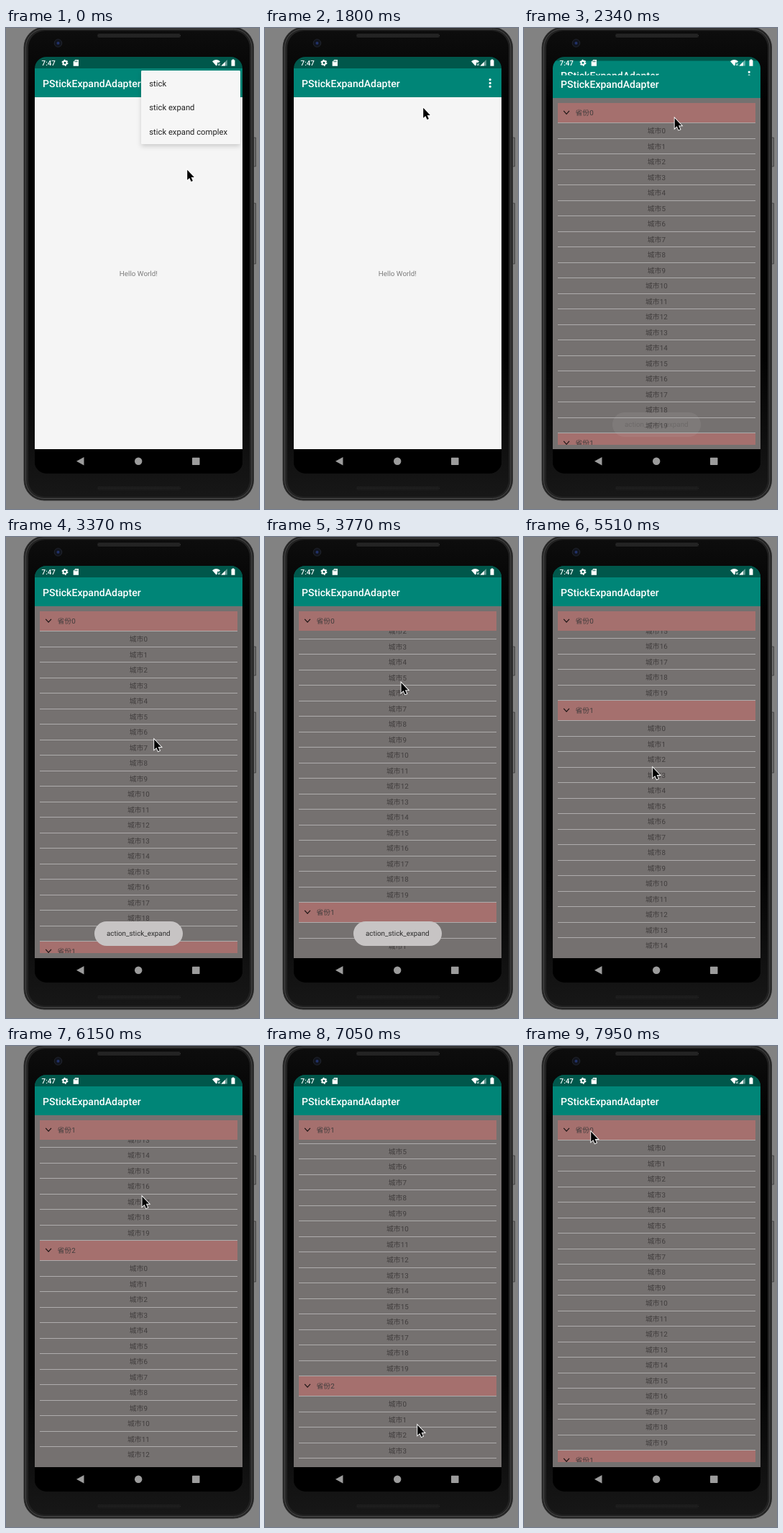
Write an HTML page that moves like this. It is 352 by 667 pixels and loops after 8 s.

```html
<!DOCTYPE html>
<html lang="en">
<head>
<meta charset="utf-8">
<title>Sticky list demo</title>
<style>
  html, body { margin: 0; width: 100%; height: 100%; overflow: hidden; background: #828282; }
  svg { display: block; }
  text {
    font-family: Roboto, "Noto Sans CJK SC", "Noto Sans CJK", sans-serif;
    font-size: 9.84px;
    text-rendering: geometricPrecision;
  }
  .mid { text-anchor: middle; }
  .title { font-size: 14.06px; font-weight: 500; fill: #fff; }
  .clock { font-weight: 500; fill: #fff; }
  .menu text { font-size: 11.25px; fill: #212121; }
  #list text, #sticky text { fill: #403d3d; }
  .pink { fill: #a5706e; }
  .line { fill: #aeacac; shape-rendering: crispEdges; }
</style>
</head>
<body>
<svg id="stage" width="352" height="667" viewBox="0 0 352 667">
  <defs>
    <linearGradient id="glass" x2="0" y2="1">
      <stop offset="0" stop-color="#0d0d0d"/>
      <stop offset=".15" stop-color="#020202"/>
      <stop offset=".7" stop-color="#020202"/>
      <stop offset="1" stop-color="#171717"/>
    </linearGradient>
    <pattern id="mesh" width="2" height="2" patternUnits="userSpaceOnUse">
      <rect width="2" height="2" fill="#1b1b1b"/>
      <rect width="1" height="1" fill="#3c3c3c"/>
    </pattern>
    <filter id="shade" x="-20%" y="-20%" width="140%" height="150%">
      <feDropShadow dx="0" dy="3" stdDeviation="3" flood-opacity=".17"/>
    </filter>
    <clipPath id="screen"><rect x="40" y="40" width="289" height="577.5" rx="16"/></clipPath>
    <clipPath id="reveal"><rect id="revealBox" x="40" y="40" width="289" height="544"/></clipPath>
    <g id="bar">
      <rect x="40" y="30" width="289" height="26.5" fill="#00574b"/>
      <rect x="40" y="56" width="289" height="40" fill="#008577"/>
      <text class="title" x="51" y="81.5">PStickExpandAdapter</text>
    </g>
    <path id="chevron" d="M55.2 113.8l3.9 4.4 3.9-4.4" fill="none" stroke="#1c1414" stroke-width="1.2"/>
  </defs>

  <!-- phone body -->
  <rect width="352" height="667" fill="#828282"/>
  <path d="M344 152h3.500v40h-3.500zM344 243h3.500v84h-3.500z" fill="#6c6c6c" stroke="#3a3a3a" stroke-width=".8"/>
  <rect x="25" y="-1" width="319.500" height="656" rx="28" fill="#222" stroke="#303030"/>
  <rect x="27.500" y="1.500" width="314.500" height="651" rx="25.500" fill="none" stroke="#4a4a4a"/>
  <rect x="31" y="4" width="308" height="646" rx="23" fill="url(#glass)"/>
  <rect x="127" y="8" width="116" height="5" rx="2.500" fill="url(#mesh)"/>
  <rect x="127" y="636" width="116" height="4.500" rx="2.200" fill="url(#mesh)" opacity=".5"/>
  <circle cx="72.500" cy="21" r="5.300" fill="#11141d" stroke="#22252e"/>
  <circle cx="72.500" cy="21" r="2" fill="#22326a"/>

  <g clip-path="url(#screen)">
    <rect x="40" y="40" width="289" height="578" fill="#000"/>
    <g id="home">
      <rect x="40" y="90" width="289" height="512" fill="#f5f5f5"/>
      <use href="#bar"/>
      <g fill="#fff">
        <circle cx="313.2" cy="71.6" r="1.6"/><circle cx="313.2" cy="76.4" r="1.6"/><circle cx="313.2" cy="81.2" r="1.6"/>
      </g>
      <text class="mid" x="184.3" y="344" fill="#7d7d7d">Hello World!</text>
    </g>

    <g id="popup" class="menu">
      <rect x="188" y="59" width="138" height="102" rx="1.4" fill="#f6f6f6" filter="url(#shade)"/>
      <rect id="press" x="188" y="93" width="138" height="34"/>
      <text x="199.3" y="80.5">stick</text>
      <text x="199.3" y="114.3">stick expand</text>
      <text x="199.3" y="148">stick expand complex</text>
    </g>

    <g clip-path="url(#reveal)">
      <g id="page">
        <rect x="40" y="90" width="289" height="494" fill="#757170"/>
        <use href="#bar"/>
        <svg x="47" y="103" width="275" height="474" viewBox="47 103 275 474"><g id="list"></g></svg>
        <g id="sticky">
          <rect class="pink" x="47" y="103" width="275" height="27"/>
          <use href="#chevron"/>
          <text id="stickyName" x="71.5" y="120.4"></text>
        </g>
      </g>
    </g>

    <!-- system bars -->
    <text class="clock" x="49.6" y="52">7:47</text>
    <g fill="#fff">
      <circle cx="82" cy="48.2" r="2.5" fill="none" stroke="#fff" stroke-width="1.9"/>
      <circle cx="82" cy="48.2" r="3.8" fill="none" stroke="#fff" stroke-width="1.4" stroke-dasharray="2 1.98"/>
      <path d="M96.3 44h4.7v8.7h-7.3v-6z"/>
      <path d="M95.9 45.3v2M97.5 45.3v2M99.1 45.3v2" stroke="#00574b" stroke-width=".8"/>
      <path d="M287 46.2q5.5-4.6 11 0l-1.6 1.9h-2.4v2.8l-1.5 1.7z"/>
      <path d="M295 49.2l2.8 2.8m0-2.8l-2.8 2.8" stroke="#fff"/>
      <path d="M307.8 44v8.5h-8.500z" opacity=".4"/>
      <path d="M304.8 47v5.5h-5.500z"/>
      <path d="M314.8 43.6h2.4v1h1.3v8.1h-5v-8.1h1.3z"/>
    </g>
    <rect x="40" y="584" width="289" height="34"/>
    <g fill="#9c9c9c">
      <path d="M98 600.7l10.5-5.8v11.6z"/>
      <circle cx="184.2" cy="600.7" r="5.2"/>
      <rect x="259" y="595.7" width="10.5" height="10.3" rx=".7"/>
    </g>

    <g id="toast">
      <rect x="123" y="533" width="123" height="34" rx="17" fill="#c7c4c4"/>
      <text class="mid" x="184.3" y="553.4" fill="#2b2b2b">action_stick_expand</text>
    </g>
  </g>

  <g id="cursor">
    <path d="M.2.8v14l3.1-2.900 2.300 5.200 2.300-1-2.300-5.100h4.300z" stroke="#fff" stroke-width="1.800" paint-order="stroke"/>
  </g>
</svg>

<script>
const LOOP = 8000, ROW = 21.5, HEAD = 28, CITIES = 20;
const SECTION = HEAD + ROW * CITIES;
const $ = id => document.getElementById(id);

// Where the hand rests or turns: time, x, y
const turns = [
  [0, 252, 196], [460, 209, 104], [760, 209, 104], [1030, 220, 110], [1800, 220, 110],
  [2600, 206, 129], [3020, 205, 320], [3370, 206, 280], [3850, 188, 195], [4400, 183, 340],
  [4890, 181, 205], [5510, 179, 319], [6270, 190, 200], [7050, 212, 525], [7950, 93, 118]
];
// Each swipe of the list: start, duration, distance
const swipes = [[3370, 900, 129], [4520, 900, 205], [5510, 1010, 596], [6620, 1000, -930]];

// Smooth 0 to 1 between two times
function ramp(t, from, to) {
  const k = Math.min(1, Math.max(0, (t - from) / (to - from)));
  return k * k * (3 - 2 * k);
}

function hand(t) {
  const i = Math.max(1, turns.findIndex(p => p[0] > t));
  const last = t >= turns[turns.length - 1][0] ? turns.length - 1 : i;
  const [t0, x0, y0] = turns[last - 1], [t1, x1, y1] = turns[last];
  const k = ramp(t, t0, t1);
  return [x0 + (x1 - x0) * k, y0 + (y1 - y0) * k];
}

const scrolled = t => Math.round(swipes.reduce((sum, [start, span, way]) =>
  sum + way * ramp(t, start, start + span), 0));

const strip = (cls, y, h) => `<rect class="${cls}" x="47" y="${y}" width="275" height="${h}"/>`;

function section(s) {
  const top = 103 + s * SECTION;
  let out = strip('pink', top, 27) + strip('line', top + 27, 1) +
    `<use href="#chevron" y="${top - 103}"/><text x="71.5" y="${top + 17.4}">省份${s}</text>`;
  for (let k = 0; k < CITIES; k++) {
    const y = top + HEAD + k * ROW;
    out += `<text class="mid" x="184.4" y="${y + 14.4}">城市${k}</text>` + strip('line', y + ROW - 1, 1);
  }
  return out;
}
$('list').innerHTML = [0, 1, 2, 3].map(section).join('');

const shift = (id, x, y) => $(id).setAttribute('transform', `translate(${x} ${y})`);
const show = (id, on) => $(id).style.display = on ? '' : 'none';

function draw(t) {
  const offset = scrolled(t);
  const open = ramp(t, 1950, 2400);

  shift('cursor', ...hand(t));
  shift('list', 0, -offset);
  shift('home', 0, -11 * open);
  shift('page', 0, 23 * (1 - open));
  $('revealBox').setAttribute('y', 40 + 544 * (1 - open));
  show('page', open > 0);
  show('popup', t < 1800);
  $('press').style.opacity = .08 * ramp(t, 760, 1030) + .04 * ramp(t, 1270, 1330);
  $('toast').style.opacity = ramp(t, 2300, 2500) - ramp(t, 4000, 4200);
  $('stickyName').textContent = '省份' + Math.floor(offset / SECTION);
}

const start = performance.now();
function loop() {
  draw((performance.now() - start) % LOOP);
  requestAnimationFrame(loop);
}
loop();
</script>
</body>
</html>
```
